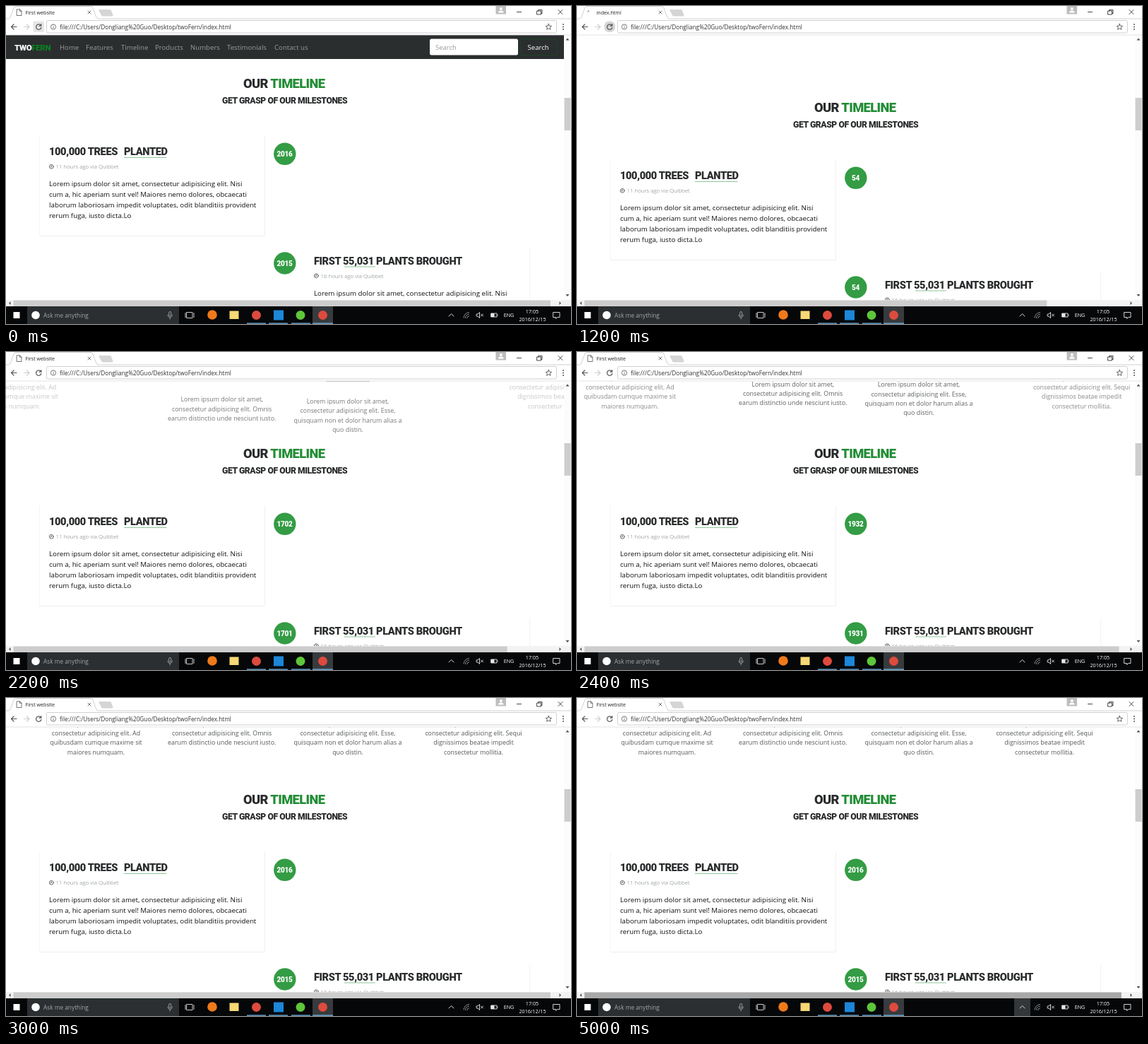
These frames come from a looping animation (800x450 px, 5.1 s). An HTML page:

```html
<!DOCTYPE html>
<html lang="en">
<head>
<meta charset="utf-8">
<title>First website</title>
<style>
  html, body { margin: 0; width: 100%; height: 100%; overflow: hidden; background: #fff; }
  svg { display: block; width: 800px; height: 450px; }
  text { font-family: "Open Sans", "Noto Sans", sans-serif; white-space: pre; }
  .cap { font-family: Roboto, "Liberation Sans", sans-serif; font-weight: 900; fill: #292b2c; }
  .h2 { font-size: 18.3px; letter-spacing: -.6px; }
  .h3 { font-size: 12.2px; letter-spacing: -.43px; }
  .h4 { font-size: 14.6px; letter-spacing: -.4px; }
  .brand { font-size: 11.6px; letter-spacing: -.4px; fill: #fff; }
  .year { font-size: 10px; letter-spacing: -.3px; fill: #fff; text-anchor: middle; }
  .body { font-size: 9.78px; fill: #111; }
  .meta { font-size: 7.9px; font-weight: 300; fill: #6f7678; }
  .nav { font-size: 9.65px; fill: #9a9b9c; }
  .col text { font-size: 8.9px; fill: #55585a; text-anchor: middle; }
  .tab { font-size: 7.1px; fill: #222; }
  .tray { font-size: 7.2px; fill: #fff; text-anchor: middle; }
  .line { fill: none; stroke-linecap: round; stroke-linejoin: round; }
</style>
</head>
<body>
<svg viewBox="0 0 800 450">
  <defs>
    <clipPath id="view"><rect y="41" width="790" height="375"/></clipPath>
    <g id="clock" class="line" stroke="#555" stroke-width=".9">
      <circle r="2.9"/><path d="M0-1.6V.4H-1.3"/>
    </g>
  </defs>
  <rect width="800" height="450" fill="#fff"/>

  <!-- page -->
  <g clip-path="url(#view)">
    <g id="timeline">
      <text class="cap h2" x="336" y="116">OUR <tspan fill="#218c34">TIMELINE</tspan></text>
      <text class="cap h3" x="306" y="138">GET GRASP OF OUR MILESTONES</text>

      <path class="line" stroke="#f5f5f5" d="M47.5 184V325"/>
      <path class="line" stroke="#efefef" d="M48 325.5H366M366.5 184V325"/>
      <text class="cap h4" x="61" y="211">100,000 TREES <tspan x="167">PLANTED</tspan></text>
      <path stroke="#8fc79a" d="M167 214.5H227.500"/>
      <use href="#clock" x="64.300" y="227.300"/>
      <text class="meta" x="70.500" y="230">11 hours ago via Quibbet</text>
      <g id="story" class="body"></g>

      <path class="line" stroke="#f3f3f3" d="M741.5 343V480"/>
      <text class="cap h4" x="436" y="365.500">FIRST 55,031 PLANTS BROUGHT</text>
      <path stroke="#8fc79a" d="M479 369H523"/>
      <use href="#clock" x="439.300" y="381.800"/>
      <text class="meta" x="445.500" y="384.500">16 hours ago via Quibbet</text>
      <text class="body" x="436" y="409.500">Lorem ipsum dolor sit amet, consectetur adipisicing elit. Nisi</text>

      <g fill="#339c44"><circle cx="394.800" cy="209.300" r="15.700"/><circle cx="394.800" cy="364" r="15.700"/></g>
      <text class="cap year" id="yearA" x="394.600" y="213">2016</text>
      <text class="cap year" id="yearB" x="394.600" y="367.700">2015</text>
    </g>

    <g id="features"></g>

    <g id="nav">
      <rect y="41" width="790" height="34" fill="#2b2e2f"/>
      <text class="cap brand" x="12" y="62.800">TWO<tspan fill="#0b8020">FERN</tspan></text>
      <g id="links" class="nav"></g>
      <rect x="600" y="46.500" width="125" height="23" rx="2.500" fill="#fff"/>
      <text x="608" y="62" font-size="9.5" fill="#999">Search</text>
      <rect x="728" y="47" width="52" height="22.500" rx="2.500" fill="none" stroke="#1c4526"/>
      <text x="738.500" y="62" font-size="9.6" font-weight="500" fill="#fff">Search</text>
    </g>
  </g>

  <!-- scroll bars -->
  <rect x="790" y="41" width="10" height="375" fill="#fcfcfc"/>
  <path fill="#505050" d="M792.500 48.500L795 45.500L797.500 48.500ZM792.500 408L795 411L797.500 408Z"/>
  <rect id="vThumb" x="790.500" y="130" width="9" height="46" fill="#cdcdcd"/>
  <rect y="416" width="800" height="9" fill="#f3f3f3"/>
  <path fill="#505050" d="M6.500 418L4 420.500L6.500 423ZM783.500 418L786 420.500L783.500 423Z"/>
  <rect id="hThumb" x="10.500" y="416.500" width="760" height="8.500" fill="#cdcdcd"/>

  <!-- browser frame -->
  <path class="line" stroke="#c4c4c4" stroke-width=".8" d="M0 18H3C6 18 6 16 7 13.500L11 3Q12 .5 14 .5H120Q122 .5 123 3L127 14Q128.500 18 131 18H800"/>
  <path fill="#d5d5d5" d="M132 5H147Q148.500 5 149 6.500L151.500 13Q152 14.500 150 14.500H137Q135.500 14.500 135 13L131.500 6.500Q131 5 132 5Z"/>
  <g id="doc" class="line" stroke="#666" stroke-width=".9"><path d="M15.500 4.800H19.500L22 7.300V13.500H15.500ZM19.500 4.800V7.300H22"/></g>
  <path id="spin" class="line" stroke="#777" stroke-width="1" d="M19 5.500A3.800 3.800 0 0 1 21 6.400"/>
  <text id="title" class="tab" x="27.500" y="11.700">First website</text>
  <path class="line" stroke="#666" stroke-width=".9" d="M116 7L120 11M120 7L116 11"/>
  <rect x="693.500" width="14.500" height="11.500" fill="#bdbdbd"/>
  <circle cx="700.800" cy="4" r="2" fill="#fff"/><path fill="#fff" d="M697 9.500Q697 6.500 700.800 6.500T704.600 9.500Z"/>
  <g class="line" stroke="#333" stroke-width=".9">
    <path d="M723.500 8.500H729.500M752 7H757.500V12H752ZM753.500 7V5.500H759V10.500H757.500M782 5.500L788 11.500M788 5.500L782 11.500"/>
  </g>
  <rect id="hover" x="38.500" y="21.500" width="15.500" height="15.500" rx="2" fill="#e6e6e6"/>
  <g class="line" stroke="#555" stroke-width="1.200">
    <path d="M15 29.500H7.500M11 26L7.500 29.500L11 33"/>
    <path stroke="#cfcfcf" d="M25.500 29.500H33M29.500 26L33 29.500L29.500 33"/>
    <path d="M49.300 27.500A3.700 3.700 0 1 0 49.900 30.500M49.800 25.500V28.200H47"/>
  </g>
  <rect x="57.500" y="20.500" width="722" height="17.500" rx="2" fill="#fff" stroke="#c6c6c6" stroke-width=".8"/>
  <circle cx="67" cy="29.500" r="3.600" fill="none" stroke="#666" stroke-width=".9"/>
  <path stroke="#666" stroke-width=".9" d="M67 29V31.500M67 27.300V28.200"/>
  <text x="76" y="32.500" font-size="8.260" fill="#333">file:///C:/Users/Dongliang%20Guo/Desktop/twoFern/index.html</text>
  <path class="line" stroke="#555" stroke-width=".9" d="M768.300 25.300L769.500 28.200L772.500 28.400L770.200 30.300L771 33.300L768.300 31.700L765.600 33.300L766.400 30.300L764.100 28.400L767.100 28.200Z"/>
  <g fill="#555"><circle cx="789" cy="26" r="1"/><circle cx="789" cy="29.500" r="1"/><circle cx="789" cy="33" r="1"/></g>
  <path stroke="#dcdcdc" stroke-width=".8" d="M0 41H800"/>

  <!-- task bar -->
  <rect y="425" width="800" height="25" fill="#050709"/>
  <rect x="10.500" y="433" width="9" height="9" fill="#fff"/>
  <rect x="30" y="425" width="215" height="25" fill="#2b2f32"/>
  <circle cx="42" cy="437.500" r="5.800" fill="#fff"/>
  <text x="53" y="441" font-size="8.300" fill="#a3a6a8">Ask me anything</text>
  <g class="line" stroke="#a3a6a8" stroke-width=".9">
    <rect x="230.700" y="432.500" width="3" height="6" rx="1.500"/><path d="M229 437Q229 440.500 232.200 440.500T235.400 437M232.200 440.500V443"/>
  </g>
  <path class="line" stroke="#ddd" stroke-width=".9" d="M256 433.500H264V441.500H256ZM254 434.500V440.500M266 434.500V440.500"/>
  <rect x="434" y="425" width="29" height="25" fill="#373b3e"/>
  <circle cx="292" cy="437" r="6.800" fill="#ef7a1a"/>
  <rect x="316.500" y="431.500" width="13" height="11.500" fill="#f8d775"/>
  <circle cx="354.500" cy="437.500" r="6.500" fill="#dd4b3e"/>
  <rect x="379" y="430.500" width="14" height="14" fill="#1c86d8"/>
  <circle cx="417" cy="437.500" r="6.500" fill="#5ec63a"/>
  <circle cx="448.500" cy="437.500" r="6.500" fill="#dd4b3e"/>
  <path stroke="#76b9ed" stroke-width="1.300" d="M341 449.200H368M372 449.200H399M404 449.200H431M434 449.200H463"/>
  <rect id="trayHover" x="619" y="425" width="23" height="25" fill="#33373a"/>
  <g class="line" stroke="#e6e6e6" stroke-width=".9">
    <path d="M627 439L630.500 435.500L634 439"/>
    <path stroke="#999" d="M648 441A8 8 0 0 1 655.500 433.500M650.300 441.500A5.500 5.500 0 0 1 655.500 436M652.700 441.700A3 3 0 0 1 655.500 438.800"/>
    <path d="M666.500 436H668L670.500 433.500V441.500L668 439H666.500ZM672.500 436L675.500 439M675.500 436L672.500 439"/>
    <path d="M687 435H695V440H687ZM696 436.800V438.200"/>
    <path d="M775 433.500H784V440.500H780.500L778.500 442.500V440.500H775Z"/>
  </g>
  <rect x="687" y="435" width="4.500" height="5" fill="#e6e6e6"/>
  <text class="tray" x="712" y="440.300">ENG</text>
  <text class="tray" x="745" y="434.500">17:05</text>
  <text class="tray" x="745.500" y="445.800">2016/12/15</text>
</svg>

<script>
const $ = id => document.getElementById(id);
const set = (el, attrs) => { for (const k in attrs) el.setAttribute(k, attrs[k]); };
const show = (el, on) => { el.style.display = on ? '' : 'none'; };
const label = (s, x, y) => `<text x="${x}" y="${y}">${s}</text>`;

$('links').innerHTML = [['Home', 76], ['Features', 113], ['Timeline', 163], ['Products', 211],
  ['Numbers', 261], ['Testimonials', 313], ['Contact us', 380]]
  .map(([s, x]) => label(s, x, 62)).join('');

$('story').innerHTML = [
  'Lorem ipsum dolor sit amet, consectetur adipisicing elit. Nisi',
  'cum a, hic aperiam sunt vel! Maiores nemo dolores, obcaecati',
  'laborum laboriosam impedit voluptates, odit blanditiis provident',
  'rerum fuga, iusto dicta.Lo'
].map((s, i) => label(s, 61, 255.3 + i * 15)).join('');

const leaf = `<g transform="translate(306 -46)">
  <path fill="#222" d="M25-18C27 2 18 18-2 18C-8 18-13 14-15 13C-18 14-20 19-23 19C-25 19-26 16-25 14C-24 11-19 9-18 7C-20-4-12-10 0-11C10-12 18-10 22-17C23-19 25-19 25-18Z"/>
  <path class="line" stroke="#fff" stroke-width="3" d="M-13 7C-6 0 2-2 9-2"/></g>`;

const blade = (x, y, turn) =>
  `<path fill="#222" transform="translate(${x} ${y}) rotate(${turn})" d="M0 0C-6-4-6-11 0-16C6-11 6-4 0 0Z"/>`;
const sprig = `<g transform="translate(484.500 -45)">
  <path class="line" stroke="#222" stroke-width="2" d="M-20 24C-6 24 5 14 2-8"/>
  ${blade(1, -8, -5)}${blade(1, -3, -62)}${blade(3, -3, 52)}${blade(0, 10, -72)}${blade(4, 9, 62)}</g>`;

// dx, dy: how far each column starts from its resting place
const cols = [
  { x: 127.5, dx: -178, dy: 0, start: 1984, lines: ['Ad', 'quibusdam cumque maxime sit', 'maiores numquam.'] },
  { x: 305.7, dx: 0, dy: 164, start: 1690, art: leaf, lines: ['Omnis', 'earum distinctio unde nesciunt iusto.'] },
  { x: 484, dx: 0, dy: 178, start: 1690, art: sprig, lines: ['Esse,', 'quisquam non et dolor harum alias a', 'quo distin.'] },
  { x: 662, dx: 178, dy: 0, start: 1984, lines: ['Sequi', 'dignissimos beatae impedit', 'consectetur mollitia.'] }
];
$('features').innerHTML = cols.map(({ x, art = '', lines: [end, ...rest] }) => {
  const text = ['Lorem ipsum dolor sit amet,', 'consectetur adipisicing elit. ' + end, ...rest];
  return `<g class="col">${art}<path stroke="#777" stroke-width=".8" d="M${x - 31} 8H${x + 31}"/>` +
    text.map((s, i) => label(s, x, 39.5 + i * 13.4)).join('') + '</g>';
}).join('');
const colEls = [...document.querySelectorAll('.col')];

// CSS "ease": cubic-bezier(.25, .1, .25, 1)
function ease(p) {
  if (p <= 0) return 0;
  if (p >= 1) return 1;
  const curve = (a, b, s) => 3 * a * s * (1 - s) ** 2 + 3 * b * s * s * (1 - s) + s ** 3;
  let lo = 0, hi = 1;
  for (let i = 0; i < 24; i++) {
    const mid = (lo + hi) / 2;
    if (curve(.25, .25, mid) < p) lo = mid; else hi = mid;
  }
  return curve(.1, 1, lo);
}
const swing = p => .5 - Math.cos(Math.PI * Math.min(1, Math.max(0, p))) / 2;

const LOOP = 5100, STEP = 100, PAGE = 1100, DONE = 1300;

function draw(t) {
  const fresh = t >= PAGE, loading = t >= 700 && t < DONE;

  show($('doc'), !loading);
  show($('spin'), loading);
  set($('spin'), { transform: `rotate(${(t - 1000) * -.36} 19 9.300)` });
  $('title').textContent = loading ? 'index.html' : 'First website';
  show($('hover'), t < DONE);
  set($('hover'), { fill: t < 300 ? '#e6e6e6' : '#d6d6d6', rx: t < 300 ? 2 : 7 });

  show($('nav'), !fresh);
  show($('features'), fresh);
  set($('timeline'), { transform: `translate(0 ${fresh ? 34 : 0})` });

  const count = fresh ? swing((t - 1036.2) / 1569.5) : 1;
  $('yearA').textContent = Math.ceil(2016 * count);
  $('yearB').textContent = Math.ceil(2015 * count);

  let left = 0;
  cols.forEach((c, i) => {
    const k = ease((t - c.start) / 1000);
    left = 1 - k;
    set(colEls[i], { transform: `translate(${c.dx * left} ${c.dy * left})`, opacity: k });
  });

  const pageWidth = fresh ? Math.max(800, 751 + 178 * left) : 800;
  set($('hThumb'), { width: 770 * 790 / pageWidth, fill: t >= 4900 ? '#a8a8a8' : '#cdcdcd' });
  set($('vThumb'), { y: t < DONE ? 130 : 129 });
  show($('trayHover'), t >= 5000);
}

const begin = performance.now();
function tick() {
  const t = (performance.now() - begin) % LOOP;
  draw(Math.floor(t / STEP) * STEP);
  requestAnimationFrame(tick);
}
tick();
</script>
</body>
</html>
```
